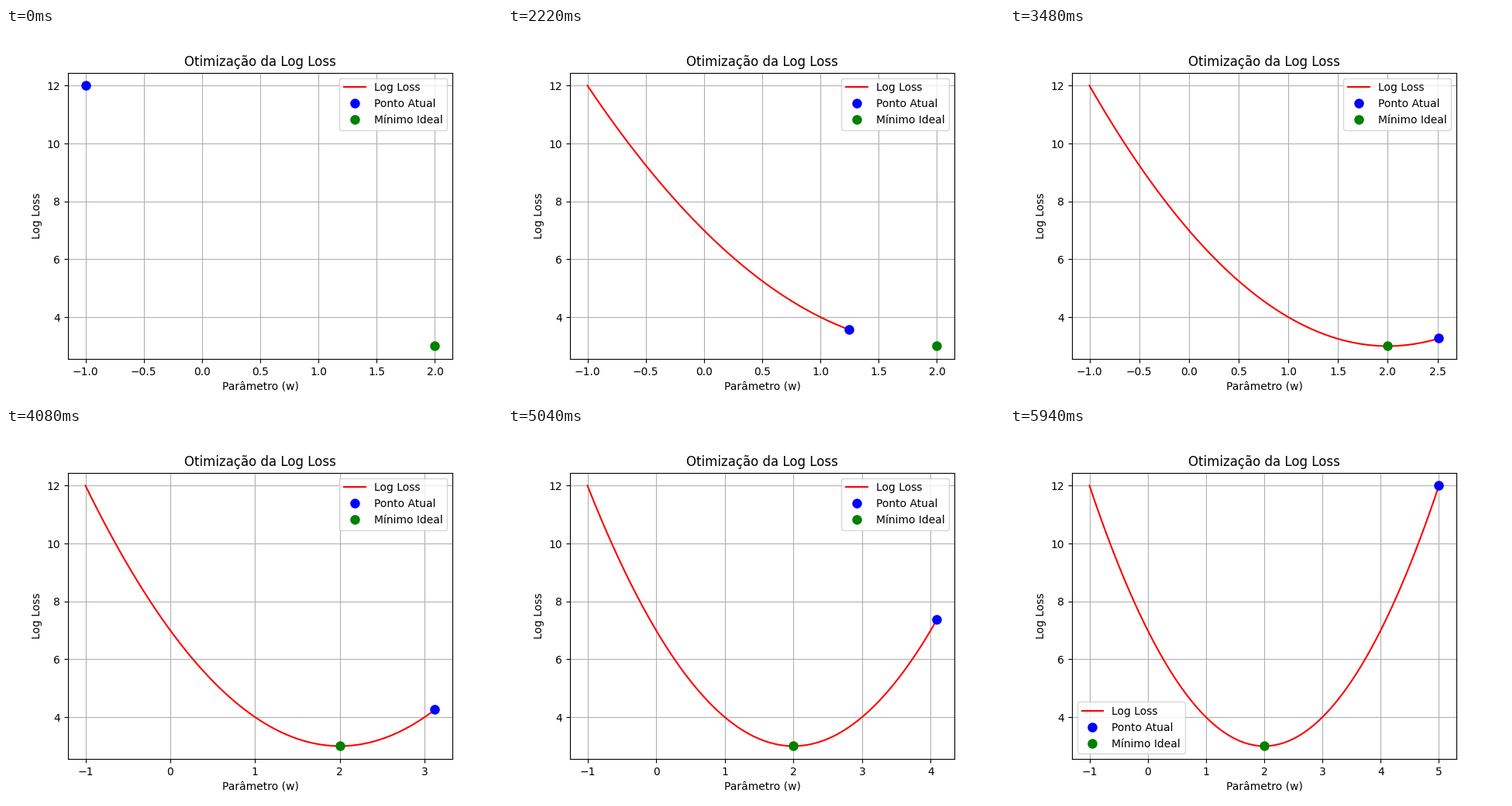
Animation, 640 px wide and 480 px high, one loop 6000 ms. Source, as a matplotlib script:

```python
import numpy as np
import matplotlib.pyplot as plt
from matplotlib.animation import FuncAnimation

FRAMES = 100
INTERVAL = 60
BEST_W = 2.0


def loss(w):
    return (w - BEST_W) ** 2 + 3


weights = np.linspace(-1, 5, FRAMES)
losses = loss(weights)

fig, ax = plt.subplots(figsize=(6.4, 4.8), dpi=100)


def update(i):
    # Redrawing from scratch lets the limits, ticks and legend adapt.
    ax.clear()
    ax.plot(weights[:i + 1], losses[:i + 1], "r-", label="Log Loss")
    ax.plot(weights[i], losses[i], "bo", markersize=8, label="Ponto Atual")
    ax.plot(BEST_W, loss(BEST_W), "go", markersize=8, label="Mínimo Ideal")
    ax.set_title("Otimização da Log Loss")
    ax.set_xlabel("Parâmetro (w)")
    ax.set_ylabel("Log Loss")
    ax.legend()
    ax.grid(True)


anim = FuncAnimation(fig, update, frames=FRAMES, init_func=lambda: update(0),
                     interval=INTERVAL, repeat=True, repeat_delay=0)
plt.show()
```
